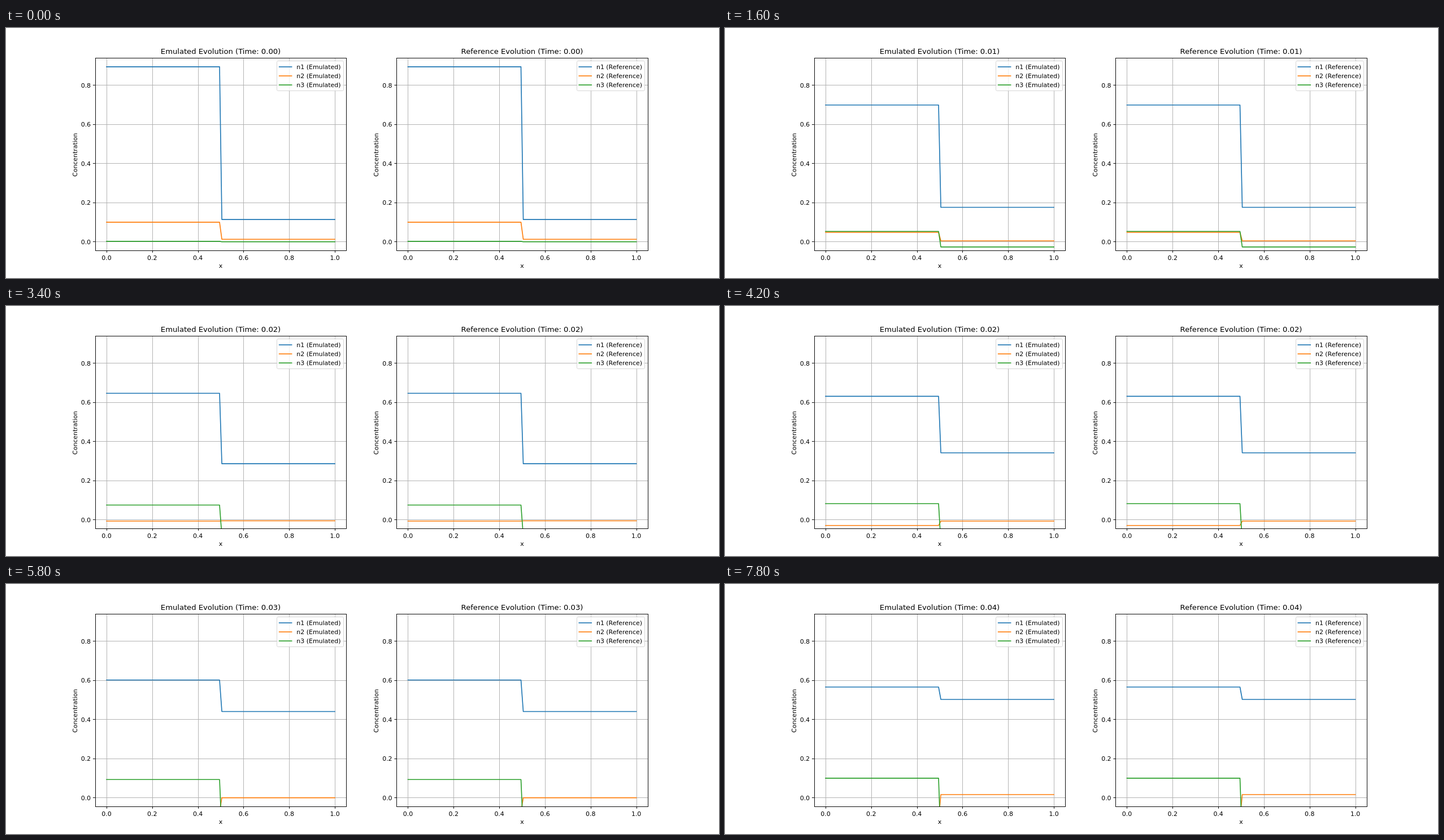
Animation, 1262 px wide and 444 px high, one loop 8000 ms. Source, as an HTML page with a canvas:

```html
<!DOCTYPE html>
<html lang="en">
<head>
<meta charset="utf-8">
<title>Concentration evolution</title>
<style>
  html, body { margin: 0; width: 100%; height: 100%; overflow: hidden; background: #fff; }
  canvas { display: block; }
</style>
</head>
<body>
<canvas id="stage" width="1262" height="444"></canvas>
<script>
const ctx = document.getElementById('stage').getContext('2d');
const W = 1262, H = 444;
const STEP_MS = 200, STEPS = 40, DT = 0.1 / 99;

// Figure layout: one typographic point in pixels, and the axes box
const PT = W / 16 / 72;
const AXES_W = 444.57, TOP = 53.28, BOTTOM = 395.16;
const ZERO_Y = 379.62, UNIT_Y = 347.5;
const SMALL = `${10 * PT}px "DejaVu Sans", sans-serif`;
const LARGE = `${12 * PT}px "DejaVu Sans", sans-serif`;

const PANELS = [
  { name: 'Emulated', left: 157.75 },
  { name: 'Reference', left: 691.24 }
];

// Each level follows a smooth curve through the knots plus a fast initial decay
const KNOTS = [0, 8, 13, 21, 29, 35, 39];
const SERIES = [
  {
    label: 'n1', color: '#1f77b4',
    low: level([0.8943, 0.699, 0.6642, 0.631, 0.6017, 0.58, 0.5658], -0.187),
    high: level([0.1135, 0.176, 0.232, 0.342, 0.4406, 0.485, 0.5025])
  },
  {
    label: 'n2', color: '#ff7f0e',
    low: level([0.0998, 0.0478, 0.0168, -0.0293, -0.071, -0.097, -0.112]),
    high: level([0.0127, 0.0046, -0.0017, -0.007, 0, 0.0097, 0.0163])
  },
  {
    label: 'n3', color: '#2ca02c',
    low: level([0.002, 0.053, 0.0666, 0.0823, 0.093, 0.098, 0.0998], 0.0285),
    high: level([0, -0.0265, -0.053, -0.115, -0.18, -0.215, -0.23])
  }
];

function level(values, fast = 0) {
  const decay = k => fast * (1 - Math.exp(-k / 3.6));
  const rest = spline(KNOTS, values.map((v, i) => v - decay(KNOTS[i])));
  return k => rest(k) + decay(k);
}

// Cubic Hermite interpolation with three-point slopes
function spline(xs, ys) {
  const last = xs.length - 1;
  const secant = i => (ys[i + 1] - ys[i]) / (xs[i + 1] - xs[i]);
  const slopes = xs.map((x, i) => {
    if (i === 0) return secant(0);
    if (i === last) return secant(last - 1);
    const before = x - xs[i - 1], after = xs[i + 1] - x;
    return (secant(i - 1) * after + secant(i) * before) / (before + after);
  });
  return x => {
    let i = 0;
    while (i < last - 1 && x > xs[i + 1]) i++;
    const h = xs[i + 1] - xs[i], u = (x - xs[i]) / h, w = 1 - u;
    return ys[i] * w * w * (1 + 2 * u) + ys[i + 1] * u * u * (3 - 2 * u)
      + h * u * w * (slopes[i] * w - slopes[i + 1] * u);
  };
}

const snap = v => Math.floor(v + 0.5) + 0.5;
const pixelMid = v => Math.floor(v) + 0.5;
const toY = v => ZERO_Y - v * UNIT_Y;
const toX = (panel, v) => panel.left + AXES_W * (0.05 + v) / 1.1;

function stroke(points, color, width) {
  ctx.strokeStyle = color;
  ctx.lineWidth = width;
  ctx.beginPath();
  for (const [x, y] of points) ctx.lineTo(x, y);
  ctx.stroke();
}

function text(str, x, y, align = 'center', font = SMALL) {
  ctx.font = font;
  ctx.textAlign = align;
  ctx.fillStyle = '#000';
  ctx.fillText(str, x, y);
}

function drawGrid(panel) {
  const { left } = panel, right = left + AXES_W;
  const tick = 3.5 * PT;
  ctx.lineCap = 'butt';
  for (let i = 0; i <= 5; i++) {
    const value = i / 5, raw = toX(panel, value), x = snap(raw);
    stroke([[x, TOP], [x, BOTTOM]], '#b0b0b0', 0.95);
    stroke([[x, BOTTOM], [x, BOTTOM + tick]], '#000', 0.95);
    text(value.toFixed(1), raw, 412);
  }
  for (let i = 0; i <= 4; i++) {
    const value = i / 5, raw = toY(value), y = pixelMid(raw);
    stroke([[left, y], [right, y]], '#b0b0b0', 0.95);
    stroke([[left - tick, y], [left, y]], '#000', 0.95);
    text(value.toFixed(1), left - 2 * tick, Math.round(raw + 4), 'right');
  }
}

function drawSeries(panel, k) {
  ctx.save();
  ctx.beginPath();
  ctx.rect(panel.left, TOP, AXES_W, BOTTOM - TOP);
  ctx.clip();
  ctx.lineCap = 'square';
  ctx.lineJoin = 'round';
  for (const s of SERIES) {
    const a = toY(s.low(k)), b = toY(s.high(k));
    stroke([
      [toX(panel, 0), a], [toX(panel, 49 / 99), a],
      [toX(panel, 50 / 99), b], [toX(panel, 1), b]
    ], s.color, 1.5 * PT);
  }
  ctx.restore();
}

function drawLegend(panel) {
  const right = panel.left + AXES_W - 5 * PT, top = TOP + 5 * PT;
  const labels = SERIES.map(s => `${s.label} (${panel.name})`);
  ctx.font = SMALL;
  const textX = right - 4 * PT - ctx.measureText(labels[0]).width;
  const handleX = textX - 28 * PT;
  const left = snap(handleX - 4 * PT);

  ctx.beginPath();
  ctx.roundRect(left, pixelMid(top), snap(right) - left, 53, 2 * PT);
  ctx.fillStyle = 'rgba(255,255,255,0.8)';
  ctx.fill();
  ctx.strokeStyle = 'rgba(204,204,204,0.8)';
  ctx.lineWidth = 1;
  ctx.stroke();

  ctx.lineCap = 'square';
  SERIES.forEach((s, i) => {
    const y = 69 + i * 16.08;
    stroke([[handleX, y], [handleX + 20 * PT, y]], s.color, 1.5 * PT);
    text(labels[i], textX, Math.round(y + 4), 'left');
  });
}

function drawPanel(panel, k) {
  const { left } = panel, mid = left + AXES_W / 2;
  drawGrid(panel);
  drawSeries(panel, k);

  const x0 = snap(left), y0 = snap(TOP);
  ctx.strokeStyle = '#000';
  ctx.lineWidth = 0.95;
  ctx.strokeRect(x0, y0, snap(left + AXES_W) - x0, snap(BOTTOM) - y0);

  drawLegend(panel);
  text(`${panel.name} Evolution (Time: ${(k * DT).toFixed(2)})`, mid, 46, 'center', LARGE);
  text('x', mid, 426);
  ctx.save();
  ctx.translate(left - 32, (TOP + BOTTOM) / 2 + 1);
  ctx.rotate(-Math.PI / 2);
  text('Concentration', 0, 0);
  ctx.restore();
}

function draw(now) {
  const k = Math.floor(now / STEP_MS) % STEPS;
  ctx.fillStyle = '#fff';
  ctx.fillRect(0, 0, W, H);
  for (const panel of PANELS) drawPanel(panel, k);
}

const start = performance.now();
function loop() {
  draw(performance.now() - start);
  requestAnimationFrame(loop);
}
loop();
</script>
</body>
</html>
```
